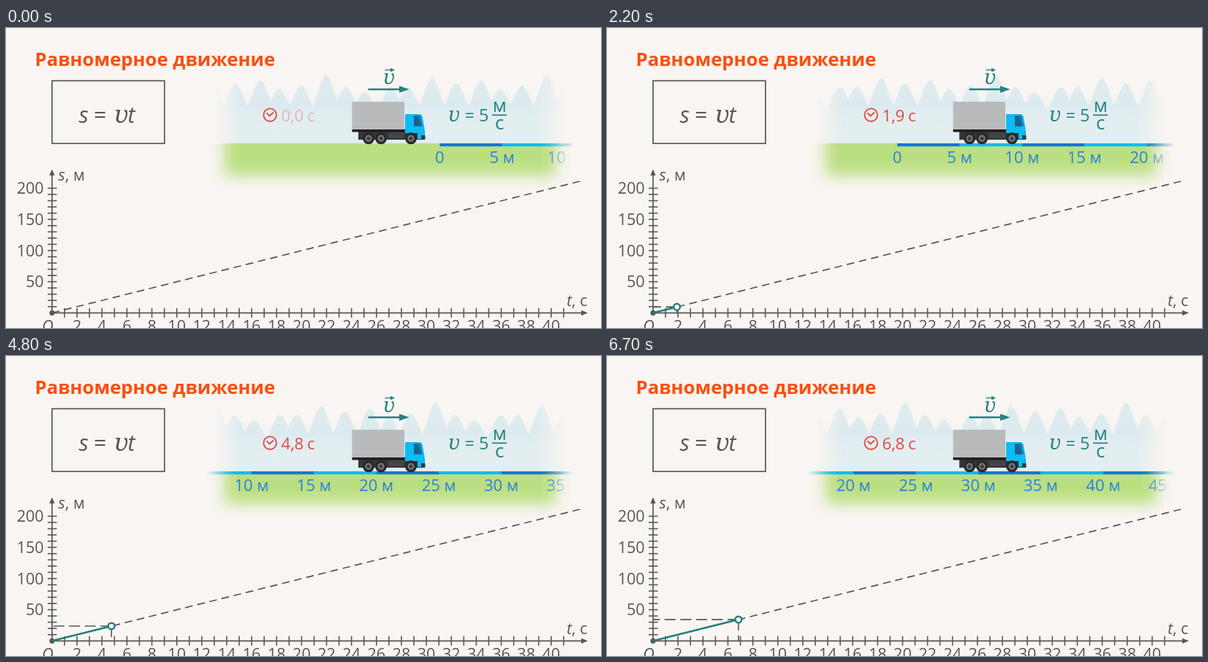
Recreate the animation shown at these times as an HTML page with a canvas. Size 814 by 411 pixels, loop 6800 ms.

```html
<!DOCTYPE html>
<html lang="ru">
<head>
<meta charset="utf-8">
<title>Равномерное движение</title>
<style>
html, body { margin: 0; width: 100%; height: 100%; overflow: hidden; background: #f9f5f2; }
canvas { display: block; }
</style>
</head>
<body>
<canvas id="stage" width="814" height="411"></canvas>
<script>
const W = 814, H = 411, LOOP = 6800;
const INK = '#595755', TEAL = '#23827f', RED = '#e2483f', BLUE = '#2b80da';
const SANS = '"Open Sans", "Noto Sans", sans-serif';
const SERIF = '"Noto Serif", "Liberation Serif", serif';
const OX = 63, OY = 390.3, SEC = 17.07, METER = 0.854;
const ROAD_STEP = 85.4, ROAD_SPEED = 89.2;
const TREE_SPEED = 94.6, TREE_PERIOD = 302;
// offset within the period, height of the top
const TREES = [[0, 64], [27, 81], [53, 88], [89, 81], [112, 81], [145, 69], [178, 76], [212, 72], [238, 84], [268, 79]];

function layer() {
  const c = document.createElement('canvas');
  c.width = W;
  c.height = H;
  return c.getContext('2d');
}

const ctx = document.getElementById('stage').getContext('2d');
const trees = layer(), road = layer(), marks = layer();
const ground = layer(), front = layer();

function text(g, str, x, y, size, color, align = 'left', style = '', family = SANS) {
  g.font = `${style} ${size}px ${family}`;
  g.textAlign = align;
  g.fillStyle = color;
  g.fillText(str, x, y);
}

function line(g, points, color, width, dash = []) {
  g.strokeStyle = color;
  g.lineWidth = width;
  g.setLineDash(dash);
  g.beginPath();
  points.forEach(([x, y]) => g.lineTo(x, y));
  g.stroke();
  g.setLineDash([]);
}

function poly(g, points, color) {
  g.fillStyle = color;
  g.beginPath();
  points.forEach(([x, y]) => g.lineTo(x, y));
  g.fill();
}

function disc(g, x, y, r, color) {
  g.fillStyle = color;
  g.beginPath();
  g.arc(x, y, r, 0, Math.PI * 2);
  g.fill();
}

function rect(g, x, y, w, h, color) {
  g.fillStyle = color;
  g.fillRect(x, y, w, h);
}

// Softens the left and right ends of a layer
function fade(g, a, b, c, d) {
  const grad = g.createLinearGradient(a, 0, d, 0);
  const span = d - a;
  grad.addColorStop(0, 'rgba(0,0,0,0)');
  grad.addColorStop((b - a) / span, '#000');
  grad.addColorStop((c - a) / span, '#000');
  grad.addColorStop(1, 'rgba(0,0,0,0)');
  g.globalCompositeOperation = 'destination-in';
  rect(g, 0, 0, W, H, grad);
  g.globalCompositeOperation = 'source-over';
}

function upsilon(g, x, y, size, color) {
  text(g, 'υ', x, y, size, color, 'left', 'italic', SERIF);
}

function drawGrass(g) {
  g.save();
  g.beginPath();
  g.rect(260, 158, 540, 70);
  g.clip();
  g.filter = 'blur(10px)';
  rect(g, 299, 120, 453, 82, '#badf80');
  g.restore();
}

function drawChart(g) {
  const size = 21.6;
  line(g, [[OX, OY], [OX, 200]], INK, 1.7);
  line(g, [[OX, OY], [790, OY]], INK, 1.7);
  poly(g, [[OX, 193.5], [OX + 3.6, 202], [OX - 3.6, 202]], INK);
  poly(g, [[796, OY], [787, OY - 3.6], [787, OY + 3.6]], INK);
  for (let m = 10; m <= 200; m += 10) {
    const y = OY - m * METER;
    line(g, [[57, y], [69.5, y]], INK, 1.6);
    if (m % 50 === 0) text(g, String(m), 51.7, y + 7.6, size, INK, 'right');
  }
  for (let s = 1; s <= 41; s++) {
    const x = OX + s * SEC;
    line(g, [[x, OY - 6.5], [x, OY + 6.5]], INK, 1.6);
    if (s % 2 === 0) text(g, String(s), x, 415.5, size, INK, 'center');
  }
  text(g, 'O', 57, 415.5, size, INK, 'center', 'italic');
  text(g, 's', 71.5, 209, size, INK, 'left', 'italic');
  text(g, ', м', 81, 209, size, INK);
  text(g, 't', 767, 381, size, INK, 'left', 'italic');
  text(g, ', с', 774, 381, size, INK);
  line(g, [[OX, OY], [785, 210]], INK, 1.7, [10.5, 6.57]);
  disc(g, OX, OY, 3.6, INK);
}

function drawFormulas(g) {
  text(g, 'Равномерное движение', 39.5, 52, 25.7, '#fb4e0f', 'left', 'bold');
  g.strokeStyle = INK;
  g.lineWidth = 1.7;
  g.strokeRect(63, 72.3, 153.8, 85.9);
  text(g, 's', 99.8, 130, 30.5, INK, 'left', 'italic');
  text(g, '=', 120, 130, 30.5, INK);
  upsilon(g, 148, 130, 33, INK);
  text(g, 't', 166.5, 130, 30.5, INK, 'left', 'italic');

  upsilon(g, 605, 128, 27, TEAL);
  text(g, '=', 627.5, 128, 23.5, TEAL);
  text(g, '5', 647, 128, 23.5, TEAL);
  text(g, 'м', 675.2, 114.7, 26, TEAL, 'center');
  line(g, [[665, 119.3], [685, 119.3]], TEAL, 1.7);
  text(g, 'с', 675.2, 138.8, 26, TEAL, 'center');

  upsilon(g, 516, 77, 27, TEAL);
  line(g, [[518.5, 57.5], [528, 57.5]], TEAL, 1.4);
  poly(g, [[532, 57.5], [526, 54.8], [526, 60.2]], TEAL);
  line(g, [[495.5, 84], [541, 84]], TEAL, 2.3);
  poly(g, [[551.5, 84], [538, 79.2], [538, 88.8]], TEAL);
}

function drawTruck(g) {
  rect(g, 482, 141, 91, 12, '#343436');
  rect(g, 523, 143, 22, 8, '#454548');
  rect(g, 473.5, 138.5, 72.5, 4, '#1f1f22');
  rect(g, 473.5, 101, 71.5, 38, '#b9babb');
  poly(g, [[546, 118], [567, 118], [569.5, 121], [572.5, 137], [573, 152], [546, 152]], '#0cbcf5');
  poly(g, [[558, 120], [567, 120], [570, 134.5], [558, 134.5]], '#1a78a8');
  poly(g, [[558, 120], [562, 120], [568, 134.5], [558, 134.5]], '#17638d');
  rect(g, 546, 144, 17, 8.5, '#343436');
  rect(g, 568, 147, 5.5, 5.5, '#2b3f4c');
  for (const x of [496, 513, 554]) {
    disc(g, x, 151.3, 8, '#29292b');
    disc(g, x, 151.3, 4.5, '#828386');
    disc(g, x, 151.3, 2.8, '#414143');
  }
}

function drawTrees(t) {
  const g = trees;
  g.clearRect(0, 0, W, H);
  const sky = g.createLinearGradient(0, 88, 0, 158);
  sky.addColorStop(0, 'rgba(221,236,240,0)');
  sky.addColorStop(0.5, 'rgba(221,236,240,.45)');
  sky.addColorStop(1, 'rgba(221,236,240,.9)');
  rect(g, 270, 60, 520, 98, sky);

  const hill = g.createLinearGradient(0, 62, 0, 150);
  hill.addColorStop(0, 'rgba(212,232,238,.75)');
  hill.addColorStop(0.5, 'rgba(212,232,238,.75)');
  hill.addColorStop(1, 'rgba(214,233,239,0)');
  g.fillStyle = hill;
  g.beginPath();
  g.moveTo(270, 158);
  for (let x = 270; x <= 790; x += 2) {
    const pos = x - 438 + TREE_SPEED * t;
    let top = 122;
    for (const [offset, y] of TREES) {
      const d = pos - offset;
      const near = d - TREE_PERIOD * Math.round(d / TREE_PERIOD);
      const bell = Math.exp(-Math.pow(near / 15.5, 2));
      top = Math.min(top, 122 - (122 - y) * bell);
    }
    g.lineTo(x, top);
  }
  g.lineTo(790, 158);
  g.fill();
  fade(g, 286, 322, 724, 766);
  ctx.drawImage(g.canvas, 0, 0);
}

function drawRoad(t) {
  const zero = 593.4 - ROAD_SPEED * t;
  road.clearRect(0, 0, W, H);
  marks.clearRect(0, 0, W, H);
  for (let i = 0; i < 12; i++) {
    const x = zero + i * ROAD_STEP;
    rect(road, x, 158, ROAD_STEP + 0.3, 4.2, i % 2 ? '#0fb9f2' : '#1476d3');
    text(marks, i ? `${i * 5} м` : '0', x, 184.5, 22, BLUE, 'center');
  }
  fade(road, 273, 314, 732, 778);
  fade(marks, 285, 318, 735, 772);
  ctx.drawImage(road.canvas, 0, 0);
  ctx.drawImage(marks.canvas, 0, 0);
}

function drawClock(t, sec) {
  ctx.strokeStyle = RED;
  ctx.lineWidth = 1.8;
  ctx.beginPath();
  ctx.arc(361.2, 119.2, 8.8, 0, Math.PI * 2);
  ctx.stroke();
  line(ctx, [[356.5, 116.5], [360.5, 120.5], [366, 115.5]], RED, 1.8);
  ctx.globalAlpha = Math.min(1, 0.32 + t * 1.5);
  text(ctx, sec.toFixed(1).replace('.', ','), 376.5, 128, 22.2, RED);
  text(ctx, 'с', 412, 128, 22.2, RED);
  ctx.globalAlpha = 1;
}

function drawPoint(sec) {
  if (sec <= 0) return;
  const x = OX + sec * SEC, y = OY - sec * 5 * METER;
  line(ctx, [[x, y], [OX, y]], INK, 1.6, [15, 6.5]);
  line(ctx, [[x, y], [x, OY]], INK, 1.6, [15, 6.5]);
  line(ctx, [[OX, OY], [x, y]], TEAL, 2.6);
  disc(ctx, x, y, 5.6, TEAL);
  disc(ctx, x, y, 3.1, '#fdfbf9');
}

drawGrass(ground);
drawChart(front);
drawFormulas(front);
drawTruck(front);

function frame(now) {
  const t = (now % LOOP) / 1000;
  const sec = Math.max(0, 1.097 * (t - 0.462));
  rect(ctx, 0, 0, W, H, '#f9f5f2');
  drawTrees(t);
  ctx.drawImage(ground.canvas, 0, 0);
  drawRoad(t);
  ctx.drawImage(front.canvas, 0, 0);
  drawClock(t, sec);
  drawPoint(sec);
}

const start = performance.now();
function tick() {
  frame(performance.now() - start);
  requestAnimationFrame(tick);
}
tick();
</script>
</body>
</html>
```
